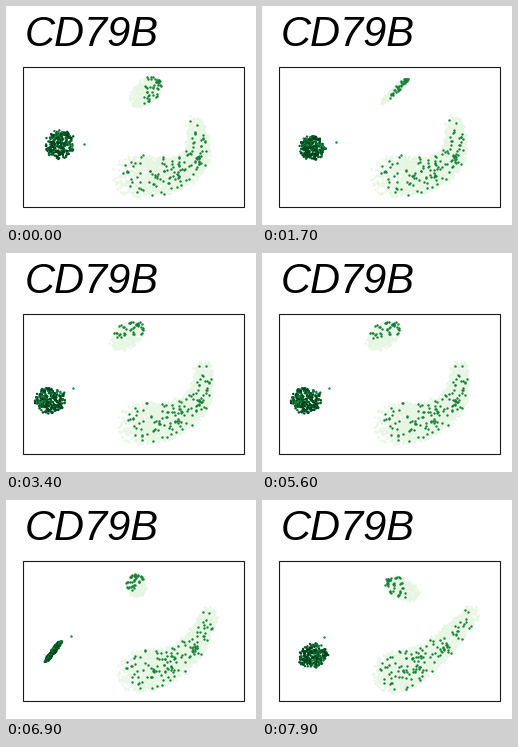
Animation of 250 by 219 pixels, one loop 8000 ms. Source, as a matplotlib script:

```python
import numpy as np
import matplotlib.pyplot as plt
from matplotlib.animation import FuncAnimation
from matplotlib.patches import Rectangle

W, H, DPI = 250, 219, 100
STEP_MS, FRAMES = 100, 80
FADE = 30                      # steps of one transition
STARTS = (4, 55)               # last resting step before each transition

PALE, MID, DEEP, DARK = "#e7f6e3", "#18803a", "#00652a", "#00441b"
rng = np.random.default_rng(12)


def disc(n):
    """n points spread evenly over the unit disc."""
    r, a = np.sqrt(rng.random(n)), rng.uniform(0, 2 * np.pi, n)
    return np.column_stack([r * np.cos(a), r * np.sin(a)])


def jitter(xy, noise=0.8):
    return xy + rng.normal(0, noise, xy.shape)


def pose(x, y, turn, flip=1, wide=1.0):
    """Map from cluster space to pixels: turn in degrees, mirror, widen."""
    c, s = np.cos(np.radians(turn)), np.sin(np.radians(turn))
    axes = np.array([[c, s], [-s * flip, c * flip]]) * (wide, 1 / wide)
    return lambda pts: jitter(pts @ axes + (x, y))


def spine(start, bend, end):
    """Bent, tapering body around a quadratic curve."""
    def place(pts):
        t, around = pts[:, :1], pts[:, 1:]
        mid = (1 - t) ** 2 * start + 2 * t * (1 - t) * bend + t ** 2 * end
        return jitter(mid + (22 - 13 * t) * around)
    start, bend, end = map(np.array, (start, bend, end))
    return place


# Three successive layouts for each group of cells.
LEFT = (pose(54, 138.5, 60),
        pose(44.3, 147.5, 0, wide=1.1),
        pose(51.5, 156, -116, flip=-1, wide=1.1))
TOP = (pose(139, 86, -50, flip=-1, wide=1.05),
       pose(121, 82.5, -45, wide=1.1),
       pose(142, 89, 225, wide=1.2))
BODY = (spine((128, 169), (205, 178), (189, 119)),
        spine((132, 170), (200, 172), (197, 116)),
        spine((131, 172), (160, 170), (210, 113)))


def spread(pts, layouts):
    return np.array([place(pts) for place in layouts])


def join(*parts):
    return np.concatenate(parts, axis=1)


def top_cells(n):
    return disc(n) * (18, 12)


def body_cells(n):
    along = rng.random(n) ** 1.3
    return np.column_stack([along, disc(n)])


# In the top group, expressing cells fill one side and crowd at the tip.
u, v = disc(50).T
side = np.column_stack([u, v])[u - v > -0.1] * (18, 12)
tip = (16, -1) + disc(9) * 3
stray = np.array([[[78, 137.5]], [[67, 134.5]], [[61.5, 137.5]]])

pale = join(spread(top_cells(330), TOP), spread(body_cells(2100), BODY))
expressed = join(spread(side, TOP), spread(tip, TOP),
                 spread(body_cells(128), BODY), stray)
dense = spread(disc(260) * 14, LEFT)
dense_colors = rng.choice([DARK, DEEP, MID], dense.shape[1], p=[0.6, 0.3, 0.1])


def ease(p):
    p = min(max(p, 0), 1)
    return 2 * p * p if p < 0.5 else 1 - 2 * (1 - p) ** 2


def blend(layouts, step):
    a, b, c = layouts
    first, second = (ease((step - s) / FADE) for s in STARTS)
    return a + (b - a) * first + (c - b) * second


fig = plt.figure(figsize=(W / DPI, H / DPI), dpi=DPI, facecolor="white")
ax = fig.add_axes([0, 0, 1, 1])
ax.set_xlim(0, W)
ax.set_ylim(H, 0)
ax.axis("off")

ax.text(19, 40.3, "CD79B", family="Liberation Sans", style="italic",
        size=30, color="black", va="baseline")
ax.add_patch(Rectangle((17, 61), 221, 140, fill=False, ec="#1a1a1a",
                       lw=0.8, zorder=5))


def dots(layouts, color, diameter, z):
    x, y = layouts[0].T
    size = (diameter * 72 / DPI) ** 2
    return ax.scatter(x, y, s=size, c=color, linewidths=0, zorder=z)


groups = [
    (dots(pale, PALE, 2.4, 1), pale),
    (dots(expressed, MID, 2.4, 2), expressed),
    (dots(dense, dense_colors, 2.4, 3), dense),
]


def draw(step):
    for artist, layouts in groups:
        artist.set_offsets(blend(layouts, step))
    return [artist for artist, _ in groups]


anim = FuncAnimation(fig, draw, frames=FRAMES, interval=STEP_MS,
                     repeat=True, repeat_delay=0, blit=False)
plt.show()
```
